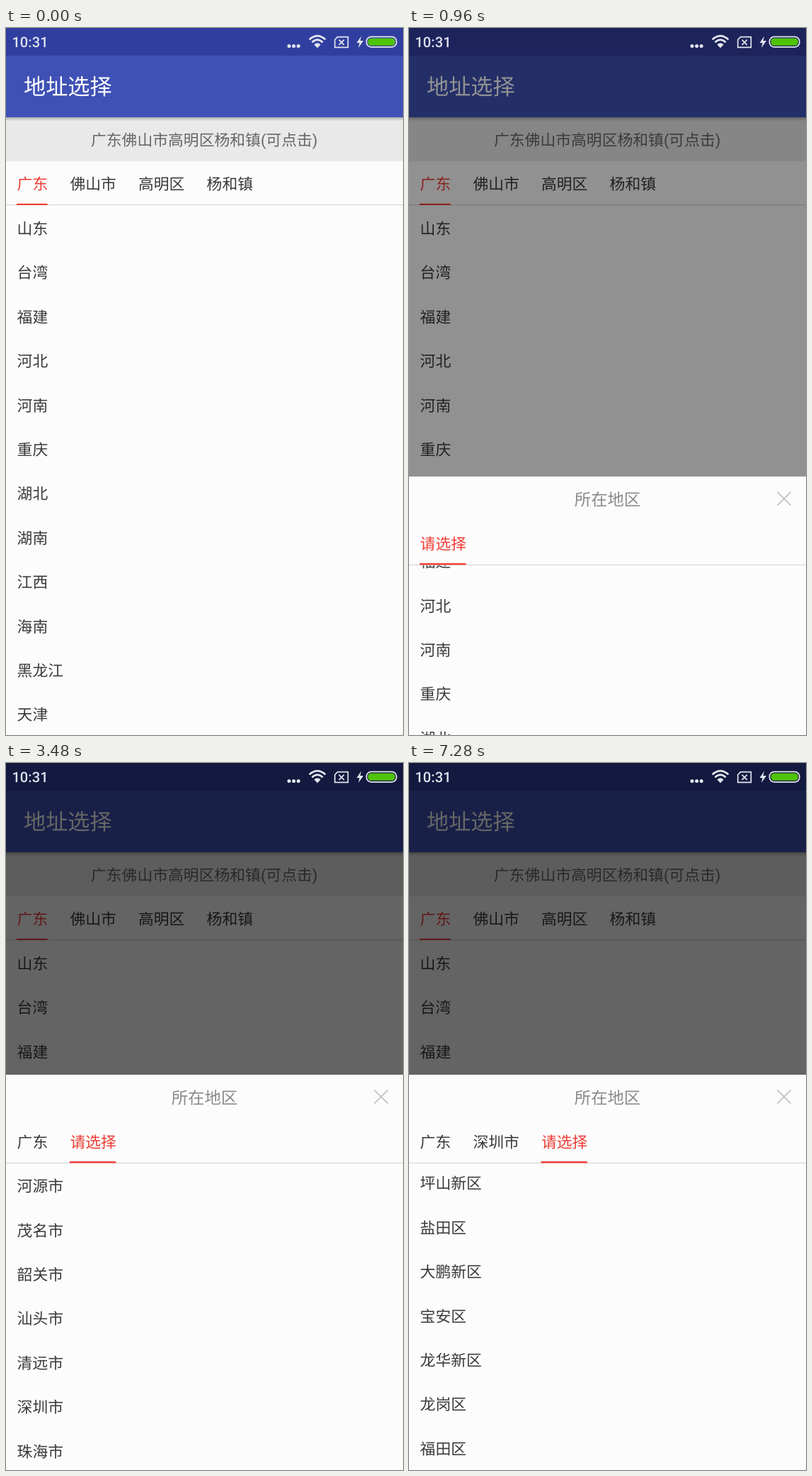
These frames come from a looping animation (561x998 px, 8 s). An HTML page:

```html
<!DOCTYPE html>
<html lang="zh-CN">
<head>
<meta charset="utf-8">
<title>地址选择</title>
<style>
html, body { margin: 0; width: 100%; height: 100%; overflow: hidden; background: #fcfcfc; }
svg { display: block; width: 561px; height: 998px; }
text {
  font-family: Roboto, "Noto Sans CJK SC", "Noto Sans CJK", sans-serif;
  font-size: 21.82px; fill: #3a3a3a; text-rendering: geometricPrecision;
}
.red { fill: #f03c34; }
</style>
</head>
<body>
<svg id="stage" viewBox="0 0 561 998">
  <defs>
    <linearGradient id="shade" x2="0" y2="1">
      <stop offset="0" stop-opacity=".25"/>
      <stop offset="1" stop-opacity="0"/>
    </linearGradient>
    <clipPath id="listClip"><rect y="125.2" width="561" height="433"/></clipPath>
  </defs>

  <rect width="561" height="998" fill="#fcfcfc"/>
  <rect y="126" width="561" height="62.2" fill="#e9e9e9"/>
  <rect y="126" width="561" height="5.5" fill="url(#shade)"/>
  <rect width="561" height="39" fill="#303f9f"/>
  <rect y="39" width="561" height="87" fill="#3f51b5"/>
  <text x="25" y="93.8" style="font-size:31.16px;fill:#fff">地址选择</text>
  <text x="280.2" y="166" text-anchor="middle" style="fill:#666">广东佛山市高明区杨和镇(可点击)</text>
  <g id="pageTabs"></g>
  <rect y="249.3" width="561" height=".9" fill="#c8c8c4"/>
  <rect x="15" y="247.9" width="43.6" height="2.1" class="red"/>
  <g id="pageList"></g>

  <rect id="dim" width="561" height="998" opacity="0"/>

  <g fill="#e4e6ee">
    <text x="8.4" y="27.2" style="font-size:20.2px;font-weight:500;fill:#dfe2ee">10:31</text>
    <circle cx="400" cy="25.5" r="2.5"/>
    <circle cx="406.6" cy="25.5" r="2.5"/>
    <circle cx="413.2" cy="25.5" r="2.5"/>
    <path d="M428.6 16.3Q440 6 451.4 16.3M432.4 20.2Q440 13 447.6 20.2" fill="none" stroke="#e4e6ee" stroke-width="2.6"/>
    <path d="M435.4 23.4Q440 19 444.6 23.4L440 28.2Z"/>
    <g fill="none" stroke="#e4e6ee" stroke-width="1.7">
      <path d="M468.5 12.7H483.3V27.3H464.7V16.5Z"/>
      <path d="M470.5 16.7L477.7 23.9M477.7 16.7L470.5 23.9"/>
    </g>
    <path d="M502 11.5L495.5 21H499.5L498 28L505 18H500.5Z"/>
    <rect x="509.4" y="12.4" width="42.4" height="14.4" rx="6.5" fill="none" stroke="#e4e6ee" stroke-width="1.7"/>
    <rect x="511.4" y="14.4" width="38.4" height="10.4" rx="4.7" fill="#4fc308"/>
  </g>

  <g id="sheet" visibility="hidden">
    <rect width="561" height="560" fill="#fcfcfc"/>
    <text x="280.5" y="40.7" text-anchor="middle" style="font-size:23.37px;fill:#8a8a8a">所在地区</text>
    <path d="M520.5 21.7L539.5 40.7M539.5 21.7L520.5 40.7" stroke="#c2c2c2" stroke-width="1.8"/>
    <g clip-path="url(#listClip)"><g id="lists"></g></g>
    <g id="sheetTabs"></g>
    <rect y="124.3" width="561" height=".9" fill="#c8c8c4"/>
    <rect id="bar" y="122.3" width="65.4" height="2.4" class="red"/>
  </g>
</svg>
<script>
const LOOP = 8000, ROW = 62.4, EM = 21.82, PAD = 15.58;
const SHEET_Y = 440, VIEW_H = 433;
const OPEN = 606, PICK_PROVINCE = 3160, PICK_CITY = 5080;

const provinces = ('山东 台湾 福建 河北 河南 重庆 湖北 湖南 江西 海南 黑龙江 天津 贵州 陕西 新疆 江苏 安徽 西藏 ' +
  '吉林 上海 山西 甘肃 宁夏 香港 澳门 浙江 广西 四川 云南 内蒙古 钓鱼岛 辽宁 广东 青海 北京').split(' ');
const cities = '河源市 茂名市 韶关市 汕头市 清远市 深圳市 珠海市'.split(' ');
const districts = '罗湖区 光明新区 南山区 坪山新区 盐田区 大鹏新区 宝安区 龙华新区 龙岗区 福田区'.split(' ');

const $ = id => document.getElementById(id);
const make = (tag, parent) =>
  parent.appendChild(document.createElementNS('http://www.w3.org/2000/svg', tag));

function label(parent, x, y, str, red) {
  const el = make('text', parent);
  el.setAttribute('x', x);
  el.setAttribute('y', y);
  if (red) el.setAttribute('class', 'red');
  el.textContent = str;
}

function list(parent, names, y) {
  const g = make('g', parent);
  names.forEach((name, i) => label(g, PAD, y + i * ROW, name));
  return g;
}

// Lays tabs out in a row and returns the x of each one.
function tabs(parent, names, y, active) {
  const g = make('g', parent);
  let x = PAD;
  const xs = names.map((name, i) => {
    const left = x;
    label(g, left, y, name, i === active);
    x += name.length * EM + 2 * PAD;
    return left;
  });
  return { g, xs };
}

tabs($('pageTabs'), ['广东', '佛山市', '高明区', '杨和镇'], 228.1, 0);
list($('pageList'), provinces.slice(0, 12), 291);

const levels = [
  { names: provinces, path: ['请选择'] },
  { names: cities, path: ['广东', '请选择'] },
  { names: districts, path: ['广东', '深圳市', '请选择'] }
].map(({ names, path }, i) => {
  const row = tabs($('sheetTabs'), path, 102.6, i);
  return {
    rows: list($('lists'), names, 165.2),
    tabs: row.g,
    barX: row.xs[i] - 0.5,
    end: names.length * ROW - VIEW_H
  };
});

const progress = (t, from, dur) => Math.min(1, Math.max(0, (t - from) / dur));
const mix = (a, b, p) => a + (b - a) * p;
const sine = p => (1 - Math.cos(Math.PI * p)) / 2;

// Cubic bezier (.4, 0, .2, 1)
function fastOutSlowIn(x) {
  let lo = 0, hi = 1;
  for (let i = 0; i < 24; i++) {
    const s = (lo + hi) / 2, r = 1 - s;
    if (1.2 * r * r * s + 0.6 * r * s * s + s ** 3 < x) lo = s; else hi = s;
  }
  return lo * lo * (3 - 2 * lo);
}

function scrollOf(level, t) {
  if (level === 0) return mix(162, levels[0].end, progress(t, 2010, 460) ** 1.3);
  if (level === 2) return levels[2].end * sine(progress(t, 7050, 220));
  return 0;
}

function render(t) {
  const open = progress(t, OPEN, 500);
  $('dim').setAttribute('opacity', 0.6 * open);
  $('sheet').setAttribute('visibility', open > 0 ? 'visible' : 'hidden');
  $('sheet').setAttribute('transform', `translate(0 ${SHEET_Y + 998 * (1 - sine(open))})`);

  const level = t < PICK_PROVINCE ? 0 : t < PICK_CITY ? 1 : 2;
  levels.forEach((item, i) => {
    const display = i === level ? 'inline' : 'none';
    item.rows.setAttribute('display', display);
    item.tabs.setAttribute('display', display);
  });
  levels[level].rows.setAttribute('transform', `translate(0 ${-scrollOf(level, t)})`);

  const from = levels[Math.max(0, level - 1)].barX;
  const moved = progress(t, level === 2 ? PICK_CITY : PICK_PROVINCE, 300);
  $('bar').setAttribute('x', mix(from, levels[level].barX, fastOutSlowIn(moved)));
}

const start = performance.now();
function tick() {
  render((performance.now() - start) % LOOP);
  requestAnimationFrame(tick);
}
tick();
</script>
</body>
</html>
```
